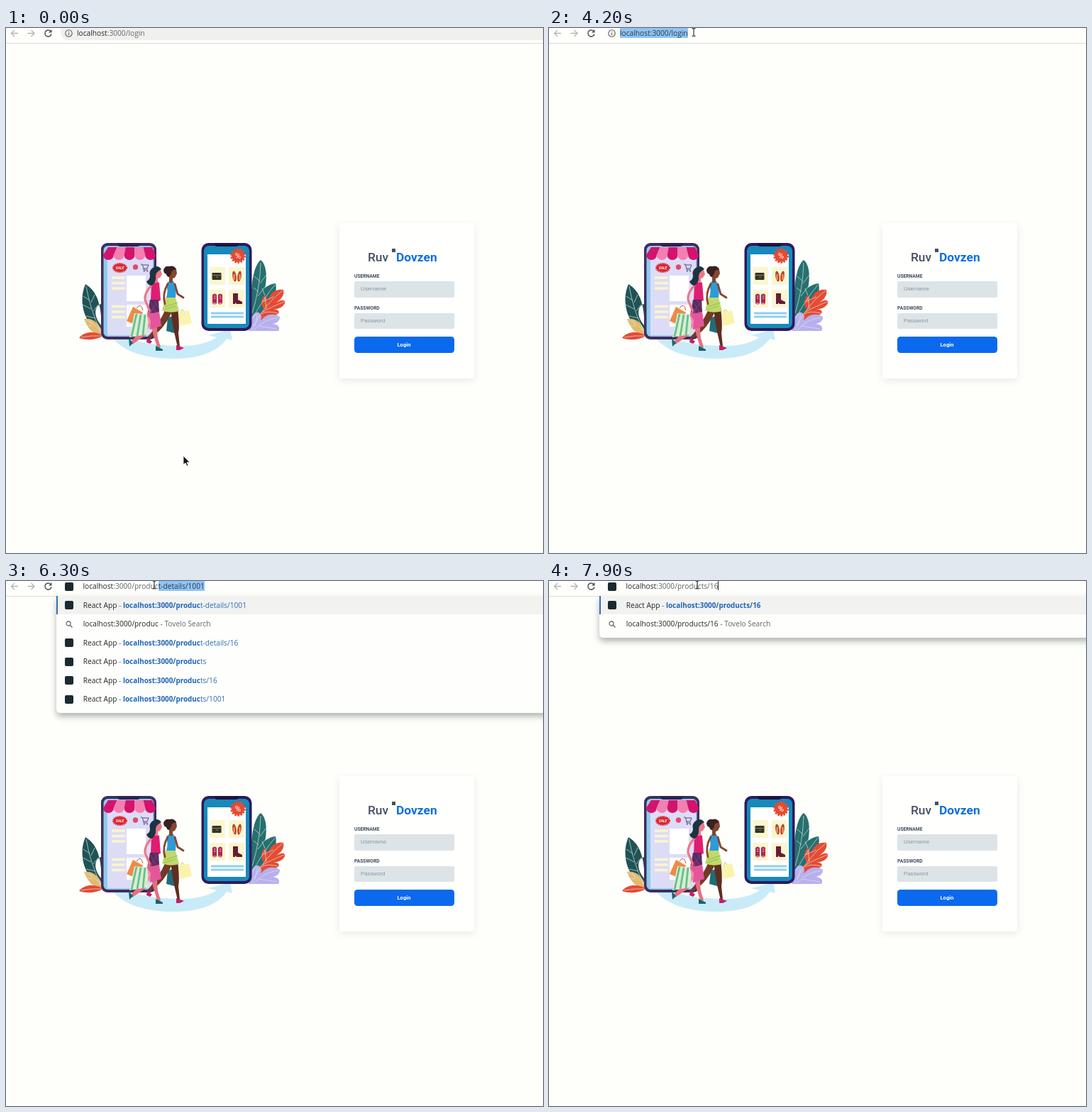
Write an HTML page that moves like this. It is 757x740 px and loops after 8 s.

```html
<!DOCTYPE html>
<html lang="en">
<head>
<meta charset="utf-8">
<title>Login</title>
<style>
  html, body { margin: 0; width: 100%; height: 100%; overflow: hidden; background: #fefefb; }
  #stage { position: relative; width: 757px; height: 740px; overflow: hidden; background: #fefefb; }
  #stage > * { position: absolute; }
  svg { left: 0; top: 0; }
  .pill { left: 77px; top: -6px; width: 700px; height: 23px; border-radius: 11px; background: #f0f1ef; }
  .rule { left: 0; top: 21px; width: 757px; height: 1px; background: #dcdddb; }
  .card { left: 470px; top: 275px; width: 190px; height: 219px; border-radius: 3px; background: #fffffd; box-shadow: 0 3px 11px rgba(60, 60, 60, .1); }
  .field { left: 491px; width: 132px; height: 22.5px; padding-left: 9px; border-radius: 2px; background: #dde4e7; color: #89939a; font: 7.8px/22.5px "Liberation Sans", sans-serif; }
  .label { left: 491px; color: #3f4a5e; font: 700 6.7px/8px Roboto, sans-serif; }
  .login { left: 490.5px; top: 434.5px; width: 141px; height: 23px; border-radius: 4.5px; background: #0b69ee; color: #fff; text-align: center; font: 700 7.6px/23px Roboto, sans-serif; }
  .brand { top: 312px; color: #475063; font: 500 17.4px/22px Roboto, sans-serif; }
  .url, .menu { white-space: pre; font: 10.2px "Open Sans", "Noto Sans", sans-serif; color: #242628; }
  .url { top: 0; line-height: 14px; }
  .url i, .row i { font-style: normal; color: #636668; }
  .url mark { background: #8ec3f3; color: #2c3a48; display: inline-block; height: 14px; }
  .url s { display: inline-block; width: 1px; height: 13px; background: #222; vertical-align: top; }
  .icon { position: absolute; left: 83px; width: 12px; height: 12px; border-radius: 2px; background: #1b2a30; }
  .menu { left: 71px; top: 20.5px; width: 720px; overflow: visible; padding-bottom: 6px; background: #fefefc; border-radius: 0 0 5px 5px; box-shadow: 0 5px 8px rgba(70, 85, 72, .42); }
  .row { position: relative; height: 26.6px; line-height: 26.6px; padding-left: 37.7px; }
  .row:first-child { background: #f2f2f1; box-shadow: inset 2px 0 #2f73b8; }
  .row .icon { left: 12px; top: 7.5px; }
  .row svg { position: absolute; left: 12px; top: 7.5px; }
  .row a { color: #2c6db3; }
  .row b { font-size: 9.9px; color: #1f66b4; }
</style>
</head>
<body>
<div id="stage">
  <div class="pill" id="pill"></div>
  <div class="rule"></div>

  <svg width="757" height="740" viewBox="0 0 757 740">
    <g fill="none" stroke="#b4b6b5" stroke-width="1.3">
      <path d="M17 7.500H7.500M12 3L7.500 7.500L12 12"/>
      <path d="M30.500 7.500H40M35.500 3L40 7.500L35.500 12"/>
      <path d="M63 4.500A4.600 4.600 0 1 0 64 8.500" stroke="#505355" stroke-width="1.500"/>
    </g>
    <path d="M64.500 2V6.500H60Z" fill="#505355"/>
    <g id="info" stroke="#5a5d5f" stroke-width="1.1" fill="none">
      <circle cx="88.500" cy="7.500" r="4.700"/><path d="M88.500 6.800V10.300M88.500 4.700V5.800"/>
    </g>

    <path fill="#c9ebf8" d="M151 438C172 462 212 467 243 466C279 465 301 453 311 438L319 440L316 425L285 433L297 436C284 445 262 449 240 448C212 447 192 444 175 438Z"/>

    <!-- plants -->
    <path fill="#1f5356" d="M135 430C111 420 101 386 112 361C130 372 135 392 135 430ZM134 389C124 392 123 407 135 420Z"/>
    <path fill="#e3ba6d" d="M137 433C124 433 116 426 110 410C122 408 133 416 137 433Z"/>
    <path fill="#e54b33" d="M137 434C124 441 113 440 103 437C110 427 127 427 137 434Z"/>
    <path fill="#26706f" d="M346 404C344 374 347 336 359 327C371 336 370 372 351 401ZM346 404C349 383 361 362 380 360C384 375 373 397 347 414Z"/>
    <path fill="#e54b33" d="M346 424C351 410 357 402 364 397C358 391 360 379 365 377C369 380 370 386 369 392C368 378 377 367 391 369C393 377 387 383 380 388C389 382 394 383 393 388C389 396 380 397 373 396C384 396 388 400 382 404C371 409 360 407 346 424Z"/>
    <path fill="#b8b0ee" d="M342 427C344 409 349 399 356 401C361 404 361 409 358 414C367 402 377 402 386 407C386 413 382 416 376 417C384 418 387 422 384 427Z"/>
    <g fill="none" stroke="#d9e6df" stroke-width=".7">
      <path d="M113 364Q119 399 134 428M109 378L118 384M108 390L120 396M113 406L126 409M125 376L120 387M130 390L123 399"/>
      <path d="M112 411Q128 418 136 432M106 436Q121 433 136 434M118 412L121 418M115 419L122 420"/>
      <path d="M359 331Q358 367 347 402M350 350L358 357M349 366L356 372M367 348L358 360M365 365L355 378M379 362Q361 384 348 409M361 367L365 377M377 379L361 386"/>
      <path d="M390 370Q365 389 349 420M392 386Q372 394 362 400M365 379L367 396M383 402Q368 398 360 403M354 403Q355 414 347 426M384 408Q362 411 350 426M382 424L356 420"/>
    </g>

    <!-- left phone -->
    <rect x="134" y="303" width="78" height="136" rx="9" fill="#402d5e"/>
    <rect x="137.500" y="307" width="71" height="128" rx="6" fill="#8fcbed"/>
    <path fill="#dddcf7" d="M143 312H207V433H143Z"/>
    <path d="M157 303H189V306Q188 308 185 308H161Q158 308 157 306Z" fill="#33214d"/>
    <path fill="#fff" d="M170 349H197V385H170ZM170 390H200V421H170Z"/>
    <path stroke="#faf5cd" stroke-width="3.600" d="M149 352H168M149 359.500H168M149 367H168M149 392.500H168M149 400H168M149 407.500H168"/>
    <g id="awning"></g>
    <ellipse cx="160.500" cy="338" rx="9.300" ry="5.800" fill="#dc2632"/>
    <ellipse cx="160.500" cy="338" rx="9.500" ry="6" fill="none" stroke="#dc2632" stroke-width="2" stroke-dasharray="1.500 1"/>
    <text x="160.500" y="340" fill="#fff" text-anchor="middle" font-family="Roboto, sans-serif" font-weight="700" font-style="italic" font-size="5">SALE</text>
    <circle cx="182.500" cy="337" r="3.700" fill="#dd4c66"/>
    <path d="M190 333H192L194 339H199L201 334H192.500M194 339V341H200" fill="none" stroke="#4b3a72" stroke-width=".9"/>
    <path d="M194 342h1.500v1.500H194zM198.500 342H200v1.500H198.500z" fill="#4b3a72"/>

    <!-- right phone -->
    <rect x="275.500" y="303" width="71" height="124" rx="10" fill="#2d1a5c"/>
    <rect x="279" y="307" width="64" height="116" rx="7" fill="#168abb"/>
    <path fill="#fff" d="M284 319H338V417H284Z"/>
    <path d="M294 303H328V306Q327 308 324 308H298Q295 308 294 306Z" fill="#21123f"/>
    <path fill="#faf6cf" d="M287.500 337H309V362H287.500ZM314 337H336V362H314ZM287.500 369H309V394H287.500ZM314 369H336V394H314Z"/>
    <path stroke="#8fd0ee" stroke-width="3" d="M289 402H335M289 407H335"/>
    <circle cx="327" cy="321" r="9" fill="#e54b33"/>
    <circle cx="327" cy="321" r="9.500" fill="none" stroke="#e54b33" stroke-width="2.500" stroke-dasharray="2.700 1.560"/>
    <text x="327" y="325" fill="#fff" text-anchor="middle" font-family="Roboto, sans-serif" font-size="11.500">%</text>
    <rect x="290.500" y="345" width="13" height="10" rx="1" fill="#343329"/>
    <path d="M291 348.500H303M296 351H299" stroke="#8c8160"/>
    <g fill="#b8432c"><ellipse cx="322" cy="350" rx="2.700" ry="7.500" transform="rotate(-9 322 350)"/><ellipse cx="329" cy="350" rx="2.700" ry="7.500" transform="rotate(9 329 350)"/></g>
    <path d="M321.500 347V355M329.500 347V355" stroke="#f4a25a" stroke-width="2"/>
    <path d="M291 376Q294 373 297 376V388Q294 391 291 388ZM299 376Q302 373 305 376V388Q302 391 299 388Z" fill="#ac2855"/>
    <path d="M293 378H295.500M293 381H295.500M301 378H303.500M301 381H303.500M292 388H296M300 388H304" stroke="#f6c9cf"/>
    <path d="M320 374H327L327 383L333 386V389H325L323 387V389H320Z" fill="#681b35"/>

    <!-- shopper on the right -->
    <path d="M228 408L240 405L241 431L226 427Z" fill="#1f6d78"/>
    <path d="M226 394L236 395Q228 415 216 427L203 438L200 435Q215 419 226 394Z" fill="#713a26"/>
    <path d="M232 394H242Q245 420 243 430L245 449L242 450Q237 430 234 412Z" fill="#602d1f"/>
    <path d="M240 447L251 451L245 454H240ZM199 436L206 442L203 445L198 443Z" fill="#c51e68"/>
    <path d="M226 361Q231 354 236 357Q241 364 239 380H226Q229 371 226 361Z" fill="#2c9bd8"/>
    <path d="M225 380H239L244 399Q231 403 220 398Z" fill="#c0d96b"/>
    <path d="M224 393L242 387M223 397L239 392" stroke="#85b85a" stroke-width=".8"/>
    <path d="M228 361Q220 374 224 389M238 361L242 375L250 380" fill="none" stroke="#86452e" stroke-width="2.800" stroke-linecap="round" stroke-linejoin="round"/>
    <path d="M230 340H240L241 346L238 352L235 353V359H230Z" fill="#86452e"/>
    <path d="M240 340Q237 334 230 336Q224 335 222 341Q222 346 226 347Q227 351 230 351Q233 347 234 342Z" fill="#382125"/>
    <path d="M243 402L258 398L262 416L246 420Z" fill="#faf3ac"/><path d="M247 401Q247 393 251 400" fill="none" stroke="#d8c168"/>

    <!-- shopper on the left -->
    <path d="M201 396H214Q212 422 214 437L218 450L214 452Q206 430 204 414L197 433L178 446L175 443L190 427Z" fill="#e66f80"/>
    <path d="M211 448L221 453V455H211ZM173 437L179 444L174 449Z" fill="#17646e"/>
    <path d="M205 361Q211 355 216 359L218 384Q211 387 204 384Z" fill="#df1d73"/>
    <path d="M203 383H215L216 400Q207 404 200 400Z" fill="#582a60"/>
    <path d="M203 386L213 401M209 384L215 395M201 393L208 402M214 385L203 401" stroke="#834f83" stroke-width=".7"/>
    <path d="M205 363Q195 373 196 383L203 400" fill="none" stroke="#ec7887" stroke-width="3.200" stroke-linecap="round"/>
    <path d="M211 341H218L220 347L217 352L214 353V359H209Z" fill="#ec7887"/>
    <path d="M219 340Q214 333 207 338Q201 342 203 349Q203 355 198 357Q200 363 206 363Q212 358 211 350Q211 344 219 340Z" fill="#1c3442"/>

    <path d="M179 393L193 401L186 420L170 413Z" fill="#ef8a48"/>
    <path d="M184 395Q190 386 193 398" fill="none" stroke="#b85d31"/>
    <path d="M181 402L202 404L199 432L174 436Z" fill="#d7efd0"/>
    <path d="M184 403L177 435M190 404L185 434M196 404L193 433" stroke="#69bd91" stroke-width="2.700"/>
    <path d="M199 404L216 400L219 420L203 425Z" fill="#e4559b"/>
    <path d="M199 404L204 412L203 425Z" fill="#f58db6"/>
    <path d="M203 403Q205 390 211 401" fill="none" stroke="#b52568"/>
  </svg>

  <div class="card"></div>
  <div class="brand" style="left:510px">Ruv</div>
  <div style="left:544px;top:311px;width:5px;height:5px;background:#475063"></div>
  <div class="brand" style="left:550px;color:#0b6fdf;font-weight:700">Dovzen</div>
  <div class="label" style="top:346px">USERNAME</div>
  <div class="field" style="top:357px">Username</div>
  <div class="label" style="top:391px">PASSWORD</div>
  <div class="field" style="top:401.500px">Password</div>
  <div class="login">Login</div>

  <div class="menu" id="menu"></div>
  <div class="icon" id="icon" style="top:1.500px"></div>
  <div class="url" id="url"></div>

  <svg width="757" height="740" viewBox="0 0 757 740">
    <path id="arrow" d="M0 0V12.500L3 10L5 14.500L7 13.500L5 9.300H9Z" fill="#151515" stroke="#fff" stroke-width=".8"/>
    <path id="beam" d="M-2.500 -5.500Q0 -5.500 0 -4.500Q0 -5.500 2.500 -5.500M0 -4.500V4.500M-2.500 5.500Q0 5.500 0 4.500Q0 5.500 2.500 5.500" fill="none" stroke="#333" stroke-width="1.2"/>
  </svg>
</div>

<script>
const $ = id => document.getElementById(id);
const LOOP = 8000, HOST = 'localhost', BASE = HOST + ':3000/';

// pointer stops: time, x, y
const moves = [
  [0, 250, 603], [900, 261, 584], [2400, 261, 583], [2500, 256, 515], [2600, 244, 400],
  [2700, 228, 270], [2800, 213, 155], [2900, 203, 90], [3100, 175, 12],
  [3400, 174, 9], [3500, 173, 10], [3700, 172, 11.5],
  [4000, 180, 10], [4100, 193, 8], [4200, 204, 6], [4400, 209, 5.5]
];

const details = ['product-details/1001', 'product-details/16', 'products', 'products/16', 'products/1001'];
const typing = [[5300, 1], [5600, 2], [5700, 3], [5900, 4], [6100, 5], [6300, 6], [6400, 7]];
const items = ['products/16', 'products/1', 'products/1001'];

// address bar: time, typed path, selected completion, suggestions
const edits = [
  [0, 'login'],
  [5000, '', '', ['', 'product-details/1001', 'product-details/16', 'products', 'login', 'products/1001']],
  ...typing.map(([t, n]) => [t, details[0].slice(0, n), details[0].slice(n), details]),
  [6500, 'products', '', ['products', ...items]],
  [7100, 'products/', '16', [...items, 'products']],
  [7300, 'products/1', '6', items],
  [7600, 'products/16', '', items],
  [7900, 'products/16', '', items.slice(0, 1)]
];

const at = (list, t) => list.findLast(s => s[0] <= t);
const lens = '<svg width="12" height="12" fill="none" stroke="#696c6e" stroke-width="1.3"><circle cx="5" cy="5" r="3"/><path d="M7.300 7.300L10.500 10.500"/></svg>';

function suggestion(path, typed) {
  const hit = path.startsWith(typed) ? typed : path;
  const bold = path ? BASE + hit : BASE.slice(0, -1);
  return `<div class="row"><span class="icon"></span>React App<i> - </i><b>${bold}</b><a>${path.slice(hit.length)}</a></div>`;
}

function menuRows(paths, typed) {
  const rows = paths.map(p => suggestion(p, typed));
  rows.splice(1, 0, `<div class="row">${lens}${BASE + typed}<i> - Tovelo Search</i></div>`);
  return rows.join('');
}

function address(typed, rest, focus, all) {
  if (all) return `<mark>${BASE + typed}</mark>`;
  const tail = rest ? `<mark>${rest}</mark>` : focus ? '<s></s>' : '';
  return `${HOST}<i>:3000/${typed}</i>${tail}`;
}

let last = '';
function draw(t) {
  const [, x, y] = at(moves, t);
  const inBar = t >= 3400;
  $('arrow').style.display = inBar ? 'none' : '';
  $('beam').style.display = inBar ? '' : 'none';
  $(inBar ? 'beam' : 'arrow').setAttribute('transform', `translate(${x} ${y})`);

  const focus = t >= 3900, all = focus && t < 4400;
  const [start, typed, rest = '', paths] = at(edits, t);
  const key = [start, inBar, focus, all].join();
  if (key === last) return;
  last = key;

  $('pill').style.background = focus ? '#fefefb' : inBar ? '#e7e9e6' : '#f0f1ef';
  $('url').style.left = paths ? '108.500px' : '100px';
  $('url').innerHTML = address(typed, rest, focus, all);
  $('info').style.display = paths ? 'none' : '';
  $('icon').style.display = $('menu').style.display = paths ? '' : 'none';
  $('menu').style.opacity = t < 5300 ? .17 : 1;
  $('menu').innerHTML = paths ? menuRows(paths, typed) : '';
}

// striped shop awning
$('awning').innerHTML = Array.from({ length: 5 }, (_, i) => {
  const top = 144 + i * 12.4, x = 137 + i * 14.8;
  return `<path fill="${i % 2 ? '#f47fb0' : '#d4136d'}" d="M${top} 309h12.500L${x + 14.8} 320a7.400 7 0 0 1 -14.800 0Z"/>`;
}).join('');

let begin;
function tick(now) {
  begin ??= now;
  draw((now - begin) % LOOP);
  requestAnimationFrame(tick);
}
draw(0);
requestAnimationFrame(tick);
</script>
</body>
</html>
```
